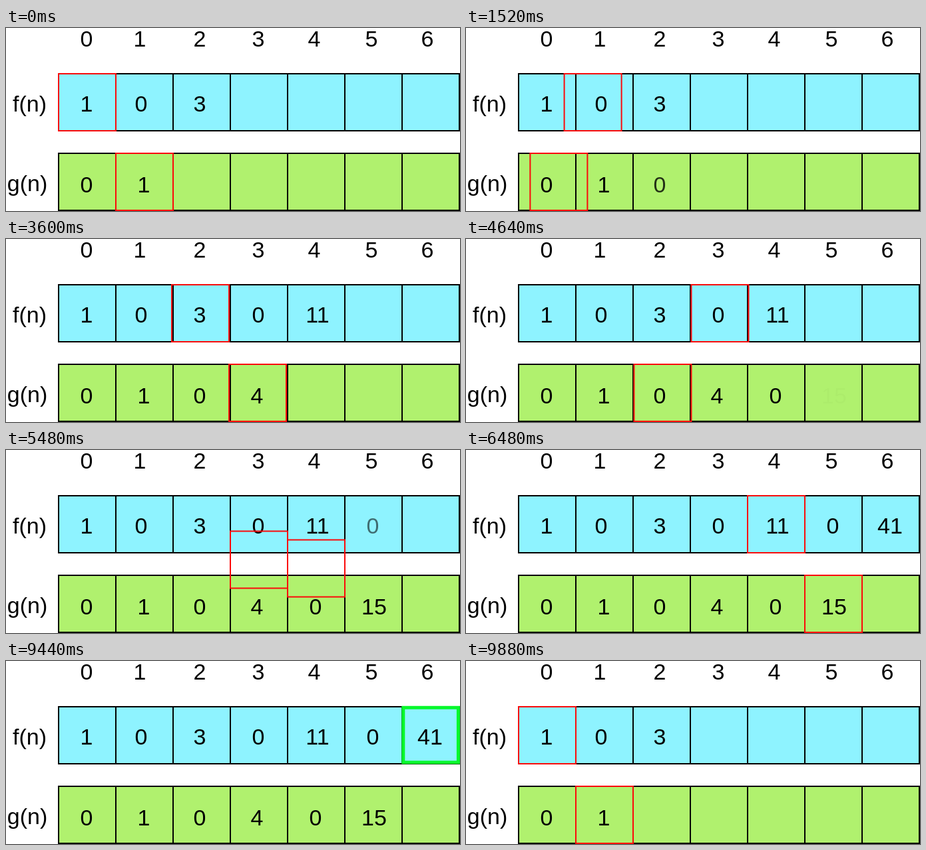
An HTML page that plays this animation: 682 by 276 pixels, repeating every 9.94 s.

```html
<!DOCTYPE html>
<html lang="en">
<head>
<meta charset="utf-8">
<title>Filling f(n) and g(n)</title>
<style>
  html, body { margin: 0; width: 100%; height: 100%; overflow: hidden; background: #fff; }
  svg { display: block; width: 100%; height: 100%; }
  text { font: 34px "Liberation Sans", Arial, sans-serif; text-anchor: middle; }
</style>
</head>
<body>
<svg id="stage" viewBox="0 0 682 276"></svg>
<script>
const LOOP = 9940, RESET = 9880, MOVE = 500;
const CELL = 86, LEFT = 79;
const rowTop = { f: 69, g: 189 };
const baseline = { f: 126, g: 247.5 };
const stage = document.getElementById("stage");

function add(tag, attrs, content) {
  const el = document.createElementNS("http://www.w3.org/2000/svg", tag);
  for (const key in attrs) el.setAttribute(key, attrs[key]);
  if (content !== undefined) el.textContent = content;
  stage.appendChild(el);
  return el;
}
const label = (x, y, s) => add("text", { x, y }, s);
const cellPos = id => ({ x: LEFT + CELL * id[1], y: rowTop[id[0]] });

// Each step: start time, cell of either marker, then the value that fades in.
const steps = [
  { at: 1180, a: "f1", b: "g0", cell: "g2", value: 0, x: 291 },
  { at: 1900, a: "f2", b: "g1", cell: "g3", value: 4, x: 377 },
  { at: 2618, a: "g2", b: "f1", cell: "f3", value: 0, x: 379 },
  { at: 3155, a: "g3", b: "f2", cell: "f4", value: 11, x: 468 },
  { at: 3970, a: "g2", b: "f3", cell: "g4", value: 0, x: 465 },
  { at: 4595, a: "g3", b: "f4", cell: "g5", value: 15, x: 553 },
  { at: 5217, a: "f3", b: "g4", cell: "f5", value: 0, x: 551 },
  { at: 5970, a: "f4", b: "g5", cell: "f6", value: 41, x: 637 }
];
const first = { a: "f0", b: "g1" };
const finish = 7050;

[121, 201, 291, 379, 463, 549, 633].forEach((x, i) => label(x, 28, i));
label(35.5, 125.5, "f(n)");
label(32, 245.5, "g(n)");

for (const [row, fill] of [["f", "#8ef3ff"], ["g", "#b0f16e"]]) {
  for (let i = 0; i < 7; i++) {
    add("rect", { ...cellPos(row + i), width: CELL, height: CELL, fill, stroke: "#000", "stroke-width": 2 });
  }
}

[121, 203, 291].forEach((x, i) => label(x, baseline.f, [1, 0, 3][i]));
[121, 207].forEach((x, i) => label(x, baseline.g, i));
for (const s of steps) s.text = label(s.x, baseline[s.cell[0]], s.value);

const marker = () => add("rect", {
  width: CELL, height: CELL, fill: "none", stroke: "#fb0a0a", "stroke-width": 2
});
const markers = { a: marker(), b: marker() };
const answer = add("rect", {
  x: 596.8, y: 70.3, width: 82.6, height: 82.6, fill: "none", stroke: "#08f82c", "stroke-width": 5
});

function ease(x) {
  x = Math.min(1, Math.max(0, x));
  return x < 0.5 ? 2 * x * x : 1 - 2 * (1 - x) * (1 - x);
}
const progress = (t, at) => ease((t - at) / MOVE);

function draw(time) {
  let t = time % LOOP;
  if (t >= RESET) t = 0;
  const done = progress(t, finish);

  for (const key of ["a", "b"]) {
    let { x, y } = cellPos(first[key]);
    for (const s of steps) {
      const p = progress(t, s.at), to = cellPos(s[key]);
      x += (to.x - x) * p;
      y += (to.y - y) * p;
    }
    markers[key].setAttribute("x", x);
    markers[key].setAttribute("y", y);
    markers[key].setAttribute("opacity", 1 - done);
  }
  for (const s of steps) s.text.setAttribute("opacity", progress(t, s.at));
  answer.setAttribute("opacity", done);
}

const begin = performance.now();
function tick() {
  draw(performance.now() - begin);
  requestAnimationFrame(tick);
}
tick();
</script>
</body>
</html>
```
